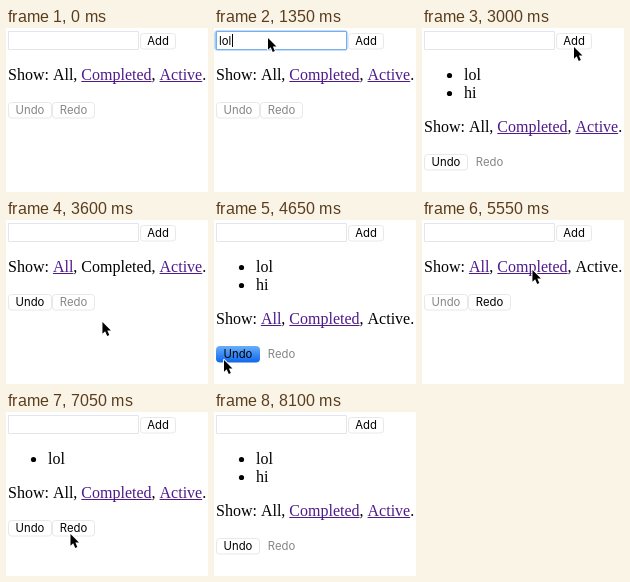
An HTML page with a canvas for the animation above (8.67 s loop, 202 by 164 pixels).

```html
<!DOCTYPE html>
<html lang="en">
<head>
<meta charset="utf-8">
<title>Todo list with undo</title>
<style>
  html, body { margin: 0; width: 100%; height: 100%; overflow: hidden; background: #fff; }
  canvas { display: block; width: 202px; height: 164px; }
</style>
</head>
<body>
<canvas></canvas>
<script>
const TICK = 150;
const SERIF = '16px "Liberation Serif", "Times New Roman", serif';
const SANS = '11.3px Inter, Roboto, sans-serif';
const PURPLE = '#4f1a8b';
const FILTERS = ['All', 'Completed', 'Active'];

const canvas = document.querySelector('canvas');
const ctx = canvas.getContext('2d');
const scale = window.devicePixelRatio || 1;
canvas.width = 202 * scale;
canvas.height = 164 * scale;

// ---- Layout ----

function widthOf(string, font) {
  ctx.font = font;
  return ctx.measureText(string).width;
}

const visibleTodos = ({ entries, done, filter }) =>
  filter === 'Completed' ? [] : entries.slice(0, done);

function listHeight(state) {
  const count = visibleTodos(state).length;
  return count && 16 + 18 * count;
}

function linkX(name) {
  const before = FILTERS.slice(0, FILTERS.indexOf(name)).map(other => other + ', ');
  return 2 + widthOf('Show: ' + before.join(''), SERIF);
}

function buttons(state) {
  const y = 74 + listHeight(state);
  return [
    { label: 'Add', x: 134, y: 5, w: 36, enabled: true },
    { label: 'Undo', x: 2, y, w: 44, enabled: state.done > 0 },
    { label: 'Redo', x: 46, y, w: 43, enabled: state.done < state.entries.length }
  ];
}

function hotspot(name) {
  if (name === 'Input') return [98, 10];
  if (FILTERS.includes(name))
    return [linkX(name) + widthOf(name, SERIF) / 2, 50 + listHeight(state)];
  const { x, y, w } = buttons(state).find(({ label }) => label === name);
  return [x + w / 2, y + 14];
}

// ---- Story: each call adds a shot to the timeline ----

const shots = [];
let now = 0;
let state = { typed: '', focus: false, entries: [], done: 0, filter: 'All', pressed: '', tip: null };

const set = change => { state = { ...state, ...change }; };

function hold(ms, tip = state.tip) {
  shots.push({ ...state, from: state.tip, tip, at: now, ms });
  set({ tip });
  now += ms;
}

function move(name, ms, dx = 0) {
  const [x, y] = hotspot(name);
  hold(ms, [x + dx, y]);
}

function change(values) {
  set(values);
  hold(TICK);
}

const type = letters => change({ typed: state.typed + letters });

const actions = {
  Add: () => set({ entries: [...state.entries, state.typed], done: state.done + 1, typed: '' }),
  Undo: () => set({ done: state.done - 1 }),
  Redo: () => set({ done: state.done + 1 })
};

function press(name) {
  change({ pressed: name, focus: false });
  set({ pressed: '' });
  actions[name]();
}

hold(150);
set({ tip: [183, 27] });
move('Input', 300, -44);
hold(300);
change({ focus: true });
[...'lol'].forEach(type);
move('Add', 300);
press('Add');
move('Input', 150);
change({ focus: true });
hold(150);
type('hi');
hold(150);
move('Add', 300);
press('Add');
move('Completed', 600, -14);
change({ filter: 'Completed' });
move('Active', 300);
change({ filter: 'Active' });
move('Undo', 450, -14);
press('Undo');
move('Undo', 150, -14);
press('Undo');
move('Completed', 450);
move('All', 450);
hold(150);
change({ filter: 'All' });
move('Redo', 300, -3);
press('Redo');
move('Redo', 300, -3);
hold(150);
actions.Redo();
hold(300);
set({ tip: null });
hold(1170);

// ---- Drawing ----

function text(string, x, y, font, color = '#000') {
  ctx.font = font;
  ctx.fillStyle = color;
  ctx.fillText(string, x, y);
}

function box(x, y, w, h, radius, stroke, fill) {
  ctx.beginPath();
  ctx.roundRect(x, y, w, h, radius);
  ctx.fillStyle = fill;
  ctx.fill();
  ctx.lineWidth = 1;
  ctx.strokeStyle = stroke;
  ctx.stroke();
}

function drawInput({ typed, focus }) {
  if (focus) box(.5, 2.5, 133, 20, 3, '#c3def9', '#9fcaf7');
  box(2.5, 3.5, 130, 18, 0, focus ? '#78aee9' : '#e2e6ec', '#fff');
  text(typed, 5, 17, SANS);
  if (focus) ctx.fillRect(Math.round(5.5 + widthOf(typed, SANS)), 6, 1, 13);
}

function drawButton({ label, x, y, w, enabled }, pressed, outlined) {
  if (pressed) {
    const blue = ctx.createLinearGradient(0, y, 0, y + 16);
    blue.addColorStop(0, '#68aff8');
    blue.addColorStop(1, '#1068ee');
    box(x + .5, y + .5, w - 1, 15.5, 3, blue, blue);
  } else if (outlined) {
    box(x + .5, y + .5, w - 1, 15.5, 3, '#e8e8e8', '#fff');
  }
  const left = x + (w - widthOf(label, SANS)) / 2;
  text(label, left, y + 12, SANS, enabled ? '#000' : '#858585');
}

function drawTodo(todo, row) {
  const y = 52 + 18 * row;
  text(todo, 42, y, SERIF);
  ctx.beginPath();
  ctx.arc(27.5, y - 4.5, 2.6, 0, 2 * Math.PI);
  ctx.fill();
}

function drawFilters(current, y) {
  text('Show: ', 2, y, SERIF);
  for (const name of FILTERS) {
    const x = linkX(name), width = widthOf(name, SERIF), link = name !== current;
    text(name, x, y, SERIF, link ? PURPLE : '#000');
    if (link) ctx.fillRect(x, y + 1, width, 1);
    text(name === 'Active' ? '.' : ',', x + width, y, SERIF);
  }
}

function drawPointer(x, y) {
  ctx.save();
  ctx.translate(x, y);
  ctx.scale(.9, .9);
  const arrow = new Path2D('M0 0V13L3 10.3L5.3 15.5L7.6 14.5L5.4 9.4H9.4Z');
  ctx.lineJoin = 'round';
  ctx.lineWidth = 2;
  ctx.strokeStyle = '#fff';
  ctx.stroke(arrow);
  ctx.fillStyle = '#000';
  ctx.fill(arrow);
  ctx.restore();
}

function draw(time) {
  const shot = shots.findLast(({ at }) => at <= time);
  const shift = listHeight(shot);

  ctx.setTransform(scale, 0, 0, scale, 0, 0);
  ctx.fillStyle = '#fff';
  ctx.fillRect(0, 0, 202, 164);

  drawInput(shot);
  visibleTodos(shot).forEach(drawTodo);
  drawFilters(shot.filter, 52 + shift);
  for (const button of buttons(shot))
    drawButton(button, shot.pressed === button.label, button.enabled || !shift);

  if (shot.tip) {
    const k = (time - shot.at) / shot.ms, eased = k * k * (3 - 2 * k);
    const [x, y] = shot.from.map((v, i) => v + (shot.tip[i] - v) * eased);
    drawPointer(x, y);
  }
}

function frame() {
  const time = performance.now() % now;
  draw(Math.floor(time / TICK) * TICK);
  requestAnimationFrame(frame);
}
frame();
</script>
</body>
</html>
```
